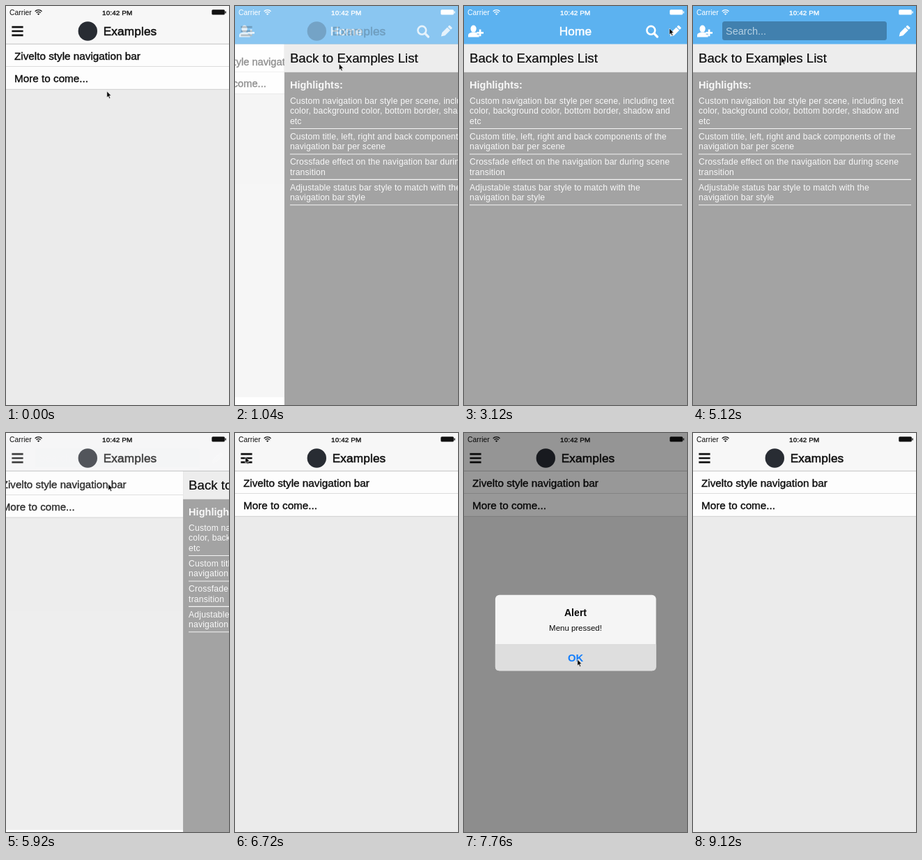
Animation of 320 by 571 pixels, one loop 9200 ms. Source, as an HTML page:

```html
<!DOCTYPE html>
<html lang="en">
<head>
<meta charset="utf-8">
<title>Navigation bar demo</title>
<style>
  html, body { margin: 0; width: 100%; height: 100%; overflow: hidden; background: #fff; }
  svg { display: block; width: 320px; height: 571px; }
  text { font-family: "Liberation Sans", Arial, sans-serif; fill: currentColor; white-space: pre; }
  .medium { stroke: currentColor; stroke-width: .36; }
  .title { font-size: 17.2px; letter-spacing: .15px; stroke: currentColor; stroke-width: .55; }
  .row { font-size: 15.27px; }
  .note { font-size: 12.2px; letter-spacing: .16px; }
  .mid { text-anchor: middle; }
</style>
</head>
<body>
<svg viewBox="0 0 320 571">
  <rect width="320" height="571" fill="#fff"/>

  <g id="listScene" color="#0a0a0a">
    <rect y="54" width="320" height="517" fill="#ebebeb"/>
    <rect id="firstRow" y="54" width="320" height="33"/>
    <rect y="87" width="320" height="32" fill="#fdfdfd"/>
    <path d="M0 86.5H320" stroke="#dcdcdc"/>
    <path d="M0 119.3H320" stroke="#cfcfcf"/>
    <text class="row medium" x="12" y="77">Zivelto style navigation bar</text>
    <text class="row medium" x="12" y="109">More to come...</text>
  </g>

  <g id="homeScene" color="#f8f8f8">
    <rect y="54" width="320" height="517" fill="#a3a3a3"/>
    <rect id="backRow" y="54" width="320" height="40.8"/>
    <text x="8" y="81" font-size="18.7" color="#0a0a0a" stroke="#0a0a0a" stroke-width=".2">Back to Examples List</text>
    <text x="8" y="118" font-size="14.55" font-weight="bold">Highlights:</text>
    <g id="notes"></g>
  </g>

  <rect id="homeBar" width="320" height="54.5" fill="#5cb2f0"/>
  <g id="listBar">
    <rect width="320" height="54" fill="#f7f7f7"/>
    <path d="M0 54.4H320" stroke="#c4c4c4"/>
  </g>

  <g id="homeItems" color="#fff">
    <text id="homeTitle" class="title mid" x="160" y="42">Home</text>
    <g id="addUser" fill="#fff">
      <ellipse cx="13.6" cy="32.6" rx="4.1" ry="5"/>
      <path d="M6 44.5V42q0-2.6 3-3.5l2.4-.9h4.6l2.6 1v2.2h3v3.7z"/>
      <path d="M18.2 38.3H28M23.1 33.4V43.2" stroke="#fff" stroke-width="2.7"/>
    </g>
    <g id="search" fill="none" stroke="#fff">
      <circle cx="268.3" cy="34.8" r="5.9" stroke-width="2.6"/>
      <path d="M272.6 39.2L277.4 44" stroke-width="3.3" stroke-linecap="round"/>
    </g>
    <g id="field">
      <rect id="fieldBox" y="22" height="27" rx="3.5" fill="#4180ae"/>
      <text id="fieldText" x="47" y="41" font-size="14.5" color="#b4cfe2">Search...</text>
    </g>
    <g id="pencil" fill="#fff" transform="translate(302.8 36.5) rotate(45)">
      <rect x="-3" y="-10" width="6" height="3.4" rx="1"/>
      <path d="M-3-5.6H3V5L0 10L-3 5z"/>
    </g>
  </g>

  <g id="listItems" color="#111">
    <path d="M8.4 30.2H24.6M8.4 36H24.6M8.4 41.8H24.6" stroke="#111" stroke-width="2.7"/>
    <circle cx="117.3" cy="36" r="13.7" fill="#282c33"/>
    <text class="title" x="139.7" y="42">Examples</text>
  </g>

  <g id="status" fill="none" stroke="currentColor">
    <text x="5" y="12.6" font-size="10.4" stroke="none">Carrier</text>
    <path d="M41.7 7.7a6.8 6.8 0 0 1 9.8 0M43.5 9.7a4.3 4.3 0 0 1 6.2 0" stroke-width="1.3"/>
    <path d="M44.9 11.2q1.7-1.3 3.4 0l-1.7 1.8z" fill="currentColor" stroke="none"/>
    <text class="medium mid" x="159.7" y="12.5" font-size="9.9" letter-spacing=".13">10:42 PM</text>
    <rect x="295.3" y="5.2" width="18.6" height="7.4" rx="1.6" fill="currentColor" stroke="none"/>
    <path d="M315.1 7.4v3" stroke-width="1.4"/>
  </g>

  <rect id="shade" width="320" height="571"/>
  <g id="alert" color="#0a0a0a">
    <rect x="43.5" y="231" width="233.5" height="110" rx="6" fill="#f5f5f5"/>
    <path id="okFill" d="M43.5 303H277V335q0 6-6 6H49.5q-6 0-6-6z" fill="#dedede"/>
    <path d="M43.5 303H277" stroke="#d6d6d6" stroke-width=".9"/>
    <text class="mid" x="160" y="262" font-size="14.3" font-weight="bold">Alert</text>
    <text class="mid" x="160" y="283" font-size="11.6">Menu pressed!</text>
    <text class="mid" x="160" y="328" font-size="15" font-weight="bold" color="#147efb">OK</text>
  </g>

  <path id="cursor" d="M.8 0V9L2.8 7.2L4.2 10.4L5.7 9.7L4.3 6.6H7z" fill="#000" stroke="#fff" stroke-width=".6"/>
</svg>

<script>
const LOOP = 9200, PUSH = 900, POP = 5774, ALERT = 6800, DISMISS = 7800;
const $ = id => document.getElementById(id);
const set = (id, attrs) => {
  for (const name in attrs) $(id).setAttribute(name, attrs[name]);
};
const clamp = v => Math.min(1, Math.max(0, v));
const ramp = (t, from, to) => clamp((t - from) / (to - from));
const smooth = v => v * v * (3 - 2 * v);
const within = (t, from, to) => t >= from && t < to;

// Overdamped spring from 0 to 1
const spring = ms => ms <= 0 ? 0 : ms > 450 ? 1 :
  clamp(1 - 1.22 * Math.exp(-.0121 * ms) + .22 * Math.exp(-.0669 * ms));

// Opacity dip of a pressed icon
const pressed = (t, at) => 1 - .75 * clamp(1 - Math.abs(t - at) / 150);

// Lines of each note; a rule follows every note
const notes = [
  ["Custom navigation bar style per scene, including text",
   "color, background color, bottom border, shadow and", "etc"],
  ["Custom title, left, right and back components of the", "navigation bar per scene"],
  ["Crossfade effect on the navigation bar during scene", "transition"],
  ["Adjustable status bar style to match with the", "navigation bar style"]
];
let y = 140, markup = "";
for (const lines of notes) {
  for (const line of lines) {
    markup += `<text class="note" x="8" y="${y}">${line}</text>`;
    y += 14.45;
  }
  markup += `<path d="M8 ${y - 7.8}H313" stroke="#f4f4f4" stroke-width="1.1"/>`;
  y += 7.5;
}
$("notes").innerHTML = markup;

// Pointer stops: time, x, y
const stops = [
  [40, 144, 122], [560, 150, 74], [900, 150, 74], [1300, 145, 104], [1480, 145, 104],
  [2160, 14, 33], [2440, 14, 33], [3040, 294, 32], [3400, 294, 32], [3760, 268, 38],
  [4640, 268, 38], [5100, 126, 73], [5240, 126, 73], [5360, 146, 73], [5960, 146, 73],
  [6400, 150, 45], [6720, 14, 34], [6860, 14, 34], [6960, 29, 53], [7520, 162, 324]
];
function pointer(t) {
  const next = stops.findIndex(s => s[0] > t);
  if (next === 0) return stops[0].slice(1);
  if (next < 0) return stops[stops.length - 1].slice(1);
  const [t0, x0, y0] = stops[next - 1], [t1, x1, y1] = stops[next];
  const k = smooth(ramp(t, t0, t1));
  return [x0 + (x1 - x0) * k, y0 + (y1 - y0) * k];
}

function draw(t) {
  const home = t < POP ? spring(t - PUSH) : 1 - spring(t - POP);
  const size = 1 - .05 * home;
  set("listScene", {
    opacity: 1 - .7 * home,
    transform: `translate(${160 - 96 * home} 285.5) scale(${size}) translate(-160 -285.5)`
  });
  set("homeScene", { transform: `translate(${320 * (1 - home)})` });
  set("homeBar", { opacity: clamp(home * 1.25) });
  set("listBar", { opacity: clamp((1 - home) * 1.25) });
  set("homeItems", { opacity: home });
  set("listItems", { opacity: 1 - home });
  set("status", { color: within(t, PUSH, POP) ? "#fff" : "#111" });
  set("firstRow", { fill: within(t, 780, PUSH) ? "#d9d9d9" : "#fdfdfd" });
  set("backRow", { fill: within(t, 5500, POP) ? "#d2d2d2" : "#ededed" });

  const open = smooth(ramp(t, 4200, 4600));
  set("addUser", { opacity: pressed(t, 2300) });
  set("pencil", { opacity: pressed(t, 3270) });
  set("search", { opacity: 1 - clamp(open * 3) });
  set("homeTitle", { opacity: 1 - clamp(open * 2) });
  set("field", { opacity: clamp(open * 3) * home * home });
  set("fieldBox", { x: 278 - 236 * open, width: 236 * open });
  set("fieldText", { opacity: clamp(open * 2 - 1) });

  const shown = ramp(t, ALERT, ALERT + 160) * (1 - ramp(t, DISMISS, DISMISS + 280));
  const zoom = .988 + .2 * Math.exp(-Math.max(0, t - ALERT) / 57);
  set("shade", { opacity: .4 * shown });
  set("alert", {
    opacity: shown,
    transform: `translate(160 286) scale(${zoom}) translate(-160 -286)`
  });
  set("okFill", { opacity: within(t, 7600, 7960) ? 1 : 0 });

  set("cursor", {
    transform: `translate(${pointer(t)})`,
    visibility: t < 8080 ? "visible" : "hidden"
  });
}

function tick() {
  draw(performance.now() % LOOP);
  requestAnimationFrame(tick);
}
tick();
</script>
</body>
</html>
```
